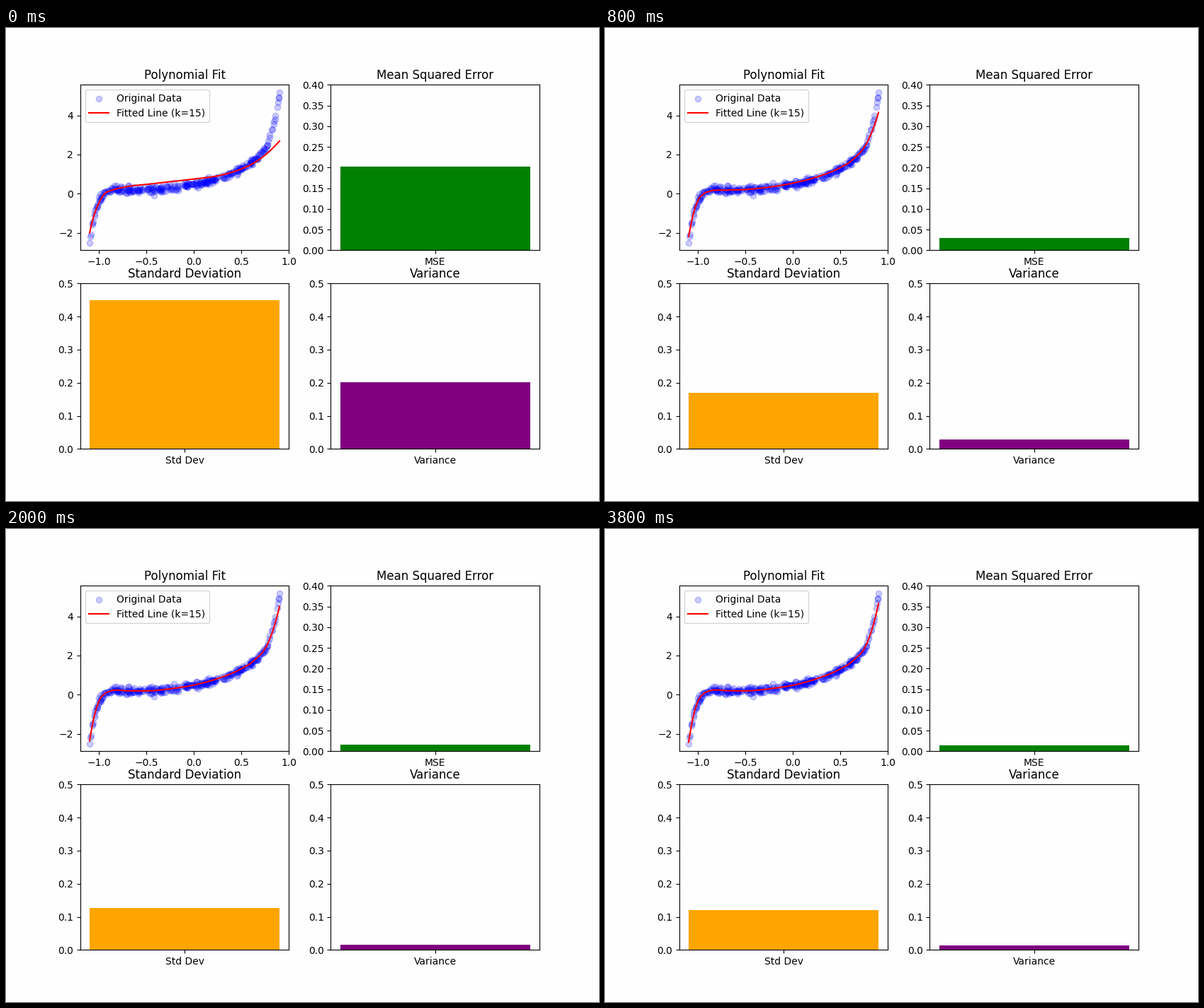
Recreate the animation shown at these times as a matplotlib script. Size 837 px wide and 669 px high, loop 4200 ms.

```python
import numpy as np
import matplotlib.pyplot as plt
from matplotlib.animation import FuncAnimation

plt.rcParams["font.family"] = "DejaVu Sans"

STEPS, HOLD, INTERVAL = 20, 1, 200
KNOTS = np.array([-1.1, -1.05, -1, -.94, -.88, -.71, -.49, -.23, 0, .26,
                  .48, .63, .78, .84, .9])


def smooth(values):
    """Cubic Hermite curve through the knots."""
    v = np.array(values, float)
    slope = np.gradient(v, KNOTS, edge_order=2)

    def curve(x):
        i = np.clip(np.searchsorted(KNOTS, x) - 1, 0, len(KNOTS) - 2)
        h = KNOTS[i + 1] - KNOTS[i]
        t = (x - KNOTS[i]) / h
        return ((1 + 2 * t) * (1 - t) ** 2 * v[i] + t * (1 - t) ** 2 * h * slope[i]
                + t * t * (3 - 2 * t) * v[i + 1] + t * t * (t - 1) * h * slope[i + 1])

    return curve


# Converged fit, plus error modes that each decay at their own rate
fit = smooth([-2.45, -1.1, -.32, .06, .2, .21, .19, .31, .48, .83,
              1.27, 1.73, 2.65, 3.5, 4.72])
modes = [
    (.87, smooth([.35, .1, 0, -.03, -.05, -.04, 0, 0, .05, .04,
                  .03, .03, 0, -.3, -.85])),
    (.55, smooth([.6, .2, -.25, -.5, -.5, -.1, .28, .4, .33, .15,
                  .03, -.04, -.3, -.62, -.95])),
    (.15, smooth([-.5, -.25, .12, .48, .5, .29, .01, -.09, -.11, -.1,
                  -.1, -.15, -.25, -.2, -.23])),
]


def prediction(x, step):
    return fit(x) + sum(rate ** step * mode(x) for rate, mode in modes)


def mse_at(step):
    return .0142 + .026 * .77 ** step + .09 * .5 ** step + .0713 * .19 ** step


def make_data():
    rng = np.random.default_rng(7)
    x = rng.uniform(-1.055, .835, 285)
    y = fit(x) + .45 * np.exp((x - .9) / .03) + rng.normal(0, .1, x.size).clip(-.24, .24)
    sparse = np.array([
        (-1.1, -2.5), (-1.09, -2.2), (-1.086, -2.08), (-1.071, -1.58),
        (-1.067, -1.5), (-1.064, -1.42), (-.82, .41), (-.42, -.1),
        (.838, 3.55), (.843, 3.7), (.855, 3.82), (.851, 3.98),
        (.88, 4.42), (.886, 4.68), (.89, 4.88), (.893, 4.92), (.9, 5.17)])
    return np.append(x, sparse[:, 0]), np.append(y, sparse[:, 1])


# The small surplus keeps the pixel size from rounding down
fig, ((ax_fit, ax_mse), (ax_std, ax_var)) = plt.subplots(
    2, 2, figsize=(8.37001, 6.69001), dpi=100, facecolor="#fefefe")

ax_fit.set_facecolor("#fefefe")
ax_fit.scatter(*make_data(), color="blue", alpha=.2, label="Original Data")
xs = np.linspace(-1.1, .9, 300)
line, = ax_fit.plot(xs, prediction(xs, 0), color="red", label="Fitted Line (k=15)")
ax_fit.set(title="Polynomial Fit", xlim=(-1.2, 1), ylim=(-2.894, 5.564))
ax_fit.legend(loc="upper left")


def bar_panel(ax, title, label, color, top):
    ax.set_facecolor("#fefefe")
    bar, = ax.bar([label], [top / 2], color=color)
    ax.set(title=title, ylim=(0, top))
    return bar


mse_bar = bar_panel(ax_mse, "Mean Squared Error", "MSE", "green", .4)
std_bar = bar_panel(ax_std, "Standard Deviation", "Std Dev", "orange", .5)
var_bar = bar_panel(ax_var, "Variance", "Variance", "purple", .5)


def update(i):
    step = min(i, STEPS - 1)
    mse = mse_at(step)
    line.set_ydata(prediction(xs, step))
    mse_bar.set_height(mse)
    std_bar.set_height(np.sqrt(mse))
    var_bar.set_height(mse)
    return line, mse_bar, std_bar, var_bar


anim = FuncAnimation(fig, update, frames=STEPS + HOLD, interval=INTERVAL,
                     repeat=True, repeat_delay=0)
plt.show()
```
